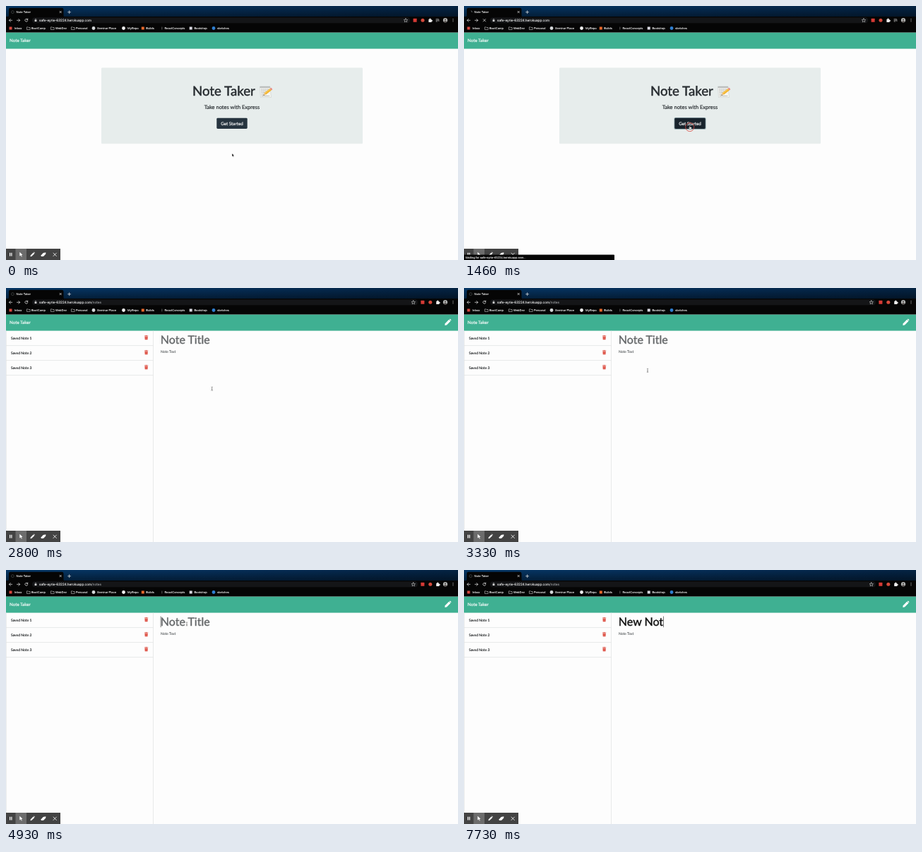
Animation, 640 px wide and 360 px high, one loop 8 s. Source, as an HTML page:

```html
<!DOCTYPE html>
<html lang="en">
<head>
<meta charset="utf-8">
<title>Note Taker</title>
<style>
  html, body { margin: 0; width: 100%; height: 100%; overflow: hidden; background: #fdfdfd; }
  svg { display: block; width: 100vw; height: 100vh; }
  text { font-family: Lato, sans-serif; text-rendering: geometricPrecision; white-space: pre; }
  text, tspan { fill: currentColor; stroke: currentColor; stroke-width: .025em; }
  .ui text { font-family: Inter, sans-serif; font-size: 4px; color: #f1f1f1; }
  .ui text.url { font-size: 4.64px; }
  .line { fill: none; stroke: #eee; stroke-width: .7; stroke-linecap: round; stroke-linejoin: round; }
</style>
</head>
<body>
<svg viewBox="0 0 640 360">
  <defs>
    <linearGradient id="strip" x2="1" y2="0">
      <stop offset="0" stop-color="#063766"/>
      <stop offset=".45" stop-color="#062f59"/>
      <stop offset="1" stop-color="#042343"/>
    </linearGradient>
    <linearGradient id="shade" x2="0" y2="1">
      <stop offset="0" stop-color="#000" stop-opacity="0"/>
      <stop offset="1" stop-color="#000" stop-opacity=".45"/>
    </linearGradient>
    <g id="trash" fill="#dc4a3d">
      <path d="M-2.6-2.6h1.5l.5-.6h1.2l.5.6h1.5v.8h-5.2z"/>
      <path d="M-2.2-1.4h4.4l-.3 4.6h-3.8z"/>
      <path d="M-.9-.5v2.8M0-.5v2.8M.9-.5v2.8" stroke="#fff" stroke-width=".35" opacity=".4"/>
    </g>
  </defs>

  <rect width="640" height="360" fill="#fdfdfd"/>
  <rect y="37.5" width="640" height="23.1" fill="#3fb092"/>
  <text x="5" y="51.2" font-size="6.25" color="#fff">Note Taker</text>

  <g id="home">
    <rect x="135" y="87.5" width="370" height="107.7" rx="1.3" fill="#e7edec"/>
    <text x="264" y="126.8" font-size="18.67" color="#262b2f">Note Taker</text>
    <g transform="translate(367.5 121.5)">
      <path d="M-8-7.6H6.4L8 8H-7z" fill="#f4f4f0" stroke="#c4c8c8" stroke-width=".5"/>
      <path d="M-8-7.6H6.4l.2 2H-7.9z" fill="#b9bcbb"/>
      <path d="M-6.3-3.6H5.2M-6.2-1.2H5M-6 1.2H1M-5.8 3.6H-1M-5.6 6H5.5" stroke="#8e9698" stroke-width=".7" stroke-dasharray="2 .5"/>
      <path d="M-3 5.2l1.3-3.6L6.2-4.6 8.3-2 .6 4z" fill="#f3b32c"/>
      <path d="M-2.2 3.2L6.8-3.6" stroke="#fad873" stroke-width=".8"/>
      <path d="M6.2-4.6l1.4-1.1q1.8.8 2.1 2.6L8.3-2z" fill="#e98a86"/>
      <path d="M-3 5.2l1.3-3.6L.6 4z" fill="#edc99a"/>
      <path d="M-3 5.2l.5-1.4.9.9z" fill="#333"/>
    </g>
    <text x="320" y="146.2" font-size="7.5" color="#262b2f" text-anchor="middle">Take notes with Express</text>
    <rect id="halo" x="297.4" y="157.9" width="45.2" height="17" rx="2" fill="#93a9ae"/>
    <rect id="button" x="298.3" y="158.8" width="43.4" height="15.2" rx="1.4"/>
    <text x="320" y="168.6" font-size="6.25" color="#fff" text-anchor="middle">Get Started</text>
  </g>

  <g id="notes">
    <path d="M.3 60.6V360M208.5 60.6V360" stroke="#dfe1e1" stroke-width=".7"/>
    <g id="rows" font-size="5" color="#16191b"></g>
    <g transform="translate(625.5 48.7) scale(1.06)" fill="#fff">
      <path d="M-4 4l.5-2.6L1.6-3.7 3.7-1.6-1.4 3.5z"/>
      <path d="M2.1-4.1l.5-.4q.5-.3 1 .1l.8.8q.4.5 0 1l-.4.5z"/>
    </g>
    <text id="title" x="218.8" y="79" font-size="16"></text>
    <text x="219" y="92.3" font-size="5" color="#5f6365">Note Text</text>
    <rect id="caret" y="65.6" width=".6" height="15.6" fill="#222"/>
  </g>

  <g class="ui">
    <rect width="640" height="16" fill="url(#strip)"/>
    <rect width="640" height="16" fill="url(#shade)"/>
    <path d="M2 15.5q2 0 2-2V5q0-2.3 2.3-2.3H79q2.5 0 2.5 2.3v8.5q0 2 2 2z" fill="#050505"/>
    <rect y="15" width="640" height="22.5" fill="#050505"/>
    <rect id="omnibox" x="37" y="16.2" height="8" rx="4" fill="#141517"/>
    <circle id="favicon" cx="9.4" cy="8.6" r="1.9" fill="none" stroke="#55595c" stroke-width=".6"/>
    <path id="spinner" d="M9.4 6.7a1.9 1.9 0 0 1 1.9 1.9" fill="none" stroke="#9aa0a6" stroke-width=".6"/>
    <text x="14.5" y="10.1">Note Taker</text>
    <path class="line" d="M76 7.3l2.4 2.4m0-2.4l-2.4 2.4M87.6 8.7h4M89.6 6.7v4"/>
    <path class="line" d="M8.7 20.3H4.6m1.8-1.9l-1.9 1.9 1.9 1.9M15.5 20.3h4.1m-1.8-1.9l1.9 1.9-1.9 1.9"/>
    <path id="reload" class="line" d="M30.5 19a2 2 0 1 0 .3 1.8M30.8 18v1.4h-1.4"/>
    <path id="stop" class="line" d="M27.2 18.6l3.4 3.4m0-3.4l-3.4 3.4"/>
    <rect x="40.6" y="19.7" width="2.8" height="2.4" rx=".3" fill="#ddd"/>
    <path class="line" d="M41.2 19.6v-.6a.8.8 0 0 1 1.6 0v.6" style="stroke-width:.5"/>
    <text class="url" x="47" y="21.6">safe-eyrie-63224.herokuapp.com<tspan id="path" color="#9a9da0">/notes</tspan></text>
    <g id="tools">
      <path class="line" style="stroke-width:.5" d="M566 17.7l.8 1.7 1.9.2-1.4 1.3.4 1.9-1.7-1-1.7 1 .4-1.9-1.4-1.3 1.9-.2z"/>
      <rect x="576.6" y="17.7" width="5" height="5" rx=".5" fill="#d63a35"/>
      <circle cx="590" cy="20.2" r="2.5" fill="#d64a3c"/>
      <path d="M598.4 18.8h1.3a.9.9 0 1 1 1.6 0h1.3v1.3a.9.9 0 1 1 0 1.5v1.3h-4.2z" fill="#eee"/>
    </g>
    <path id="media" class="line" d="M609 18.7h3.4M609 20.3h2.6M609 21.9h1.6m2.2-2.4v2.2" style="stroke-width:.6"/>
    <circle cx="622" cy="20.2" r="3.1" fill="#b4b6b5"/>
    <circle cx="622" cy="19.4" r="1.1" fill="#5b5552"/>
    <path d="M619.8 22.2q2.2-2.6 4.4 0a3 3 0 0 1-4.4 0z" fill="#5b5552"/>
    <path d="M633 18.5v.01M633 20.2v.01M633 21.9v.01" class="line" style="stroke-width:.9"/>
    <path class="line" d="M220.8 30v3" style="stroke:#999;stroke-width:.6"/>
    <g id="marks"></g>
  </g>

  <g id="recorder">
    <rect y="344" width="77" height="16" fill="#434343"/>
    <rect x="13.5" y="344" width="15.5" height="16" fill="#6c6c6c"/>
    <path d="M5 349.8h1.2v4.8H5zM7.3 349.8h1.2v4.8H7.3z" fill="#fff"/>
    <path d="M19.3 348.7l4.2 4.1-1.8.1 1.1 2.3-.9.4-1-2.3-1.6 1.2z" fill="#fff"/>
    <path d="M34.4 355.2l.5-2 3.8-3.8 1.5 1.5-3.8 3.8zM39.1 349l.6-.5 1.4 1.4-.5.6z" fill="#fff"/>
    <path d="M49.7 353.3l3-3.4 3.7-.7-.2 2.2-3 3.4-3.4.3z" fill="#fff"/>
    <path class="line" d="M67 350.1l4.4 4.4m0-4.4l-4.4 4.4" style="stroke:#fff;stroke-width:.8"/>
  </g>
  <g id="status" class="ui">
    <path d="M0 352.5h212q1 0 1 1V360H0z" fill="#050505"/>
    <text x="2" y="357.8" style="font-size:3.85px">Waiting for safe-eyrie-63224.herokuapp.com...</text>
  </g>

  <circle id="ring" fill="none" stroke="#d8453c" stroke-width=".8"/>
  <g id="pointer">
    <path id="arrow" d="M0 0v4.3l1-.9.8 1.7.8-.4-.8-1.6h1.4z" fill="#111" stroke="#fff" stroke-width=".35"/>
    <path id="hand" d="M-.5.2q.5-.5 1 0v1.7l1.7.4q.6.2.5.8l-.4 1.7H-.6l-1.3-2q.2-.6.8-.2l.6.5z" fill="#fff" stroke="#111" stroke-width=".45"/>
    <path id="beam" d="M-1.1-2.6q.9 0 1.1.5.2-.5 1.1-.5M0-2.1v4.2M-1.1 2.6q.9 0 1.1-.5.2.5 1.1.5M-.6.9H.6" fill="none" stroke="#333" stroke-width=".48"/>
  </g>
</svg>

<script>
const LOOP = 8000, STEP = 1000 / 15;
const CLICK = 1330, LOADING = 1395, COMMIT = 2395, PAGE = 2725, FOCUS = 4730;
const TYPED = "New Not", KEYS = [6930, 7060, 7200, 7330, 7400, 7530, 7730];
// time, x, y of the pointer's hot spot
const TRACK = [
  [0, 320, 209], [430, 320.4, 193], [860, 320, 174], [1190, 319.7, 169.6],
  [2200, 319.7, 169.6], [2600, 308.8, 158], [2930, 280, 133],
  [3330, 260, 117], [4060, 257, 84], [4400, 256, 76.5]
];

const el = {};
document.querySelectorAll("[id]").forEach(n => el[n.id] = n);
const show = (node, on) => node.style.display = on ? "" : "none";
const set = (node, attrs) => { for (const k in attrs) node.setAttribute(k, attrs[k]); };

el.rows.innerHTML = [1, 2, 3].map(n => {
  const y = 61 + 21 * n;
  return `<text x="7" y="${y - 9}">Saved Note ${n}</text>
    <use href="#trash" x="198.6" y="${y - 11.9}"/>
    <path d="M0 ${y - .4}H208.5" stroke="#dfe1e1" stroke-width=".7"/>`;
}).join("");

const icons = {
  square: (x, c) => `<rect x="${x - 2}" y="29.5" width="4" height="4" fill="${c}"/>`,
  circle: (x, c) => `<circle cx="${x}" cy="31.5" r="2.4" fill="${c}"/>`,
  folder: x => `<path class="line" style="stroke-width:.5" d="M${x - 2.2} 29.9h1.6l.6.6h2.2v2.9h-4.4z"/>`
};
el.marks.innerHTML = [
  ["square", 6.5, "Inbox", 12, "#d8493f"], ["folder", 32, "BootCamp", 36],
  ["folder", 66, "WebDev", 70], ["folder", 95, "Personal", 99],
  ["circle", 124, "Seminar Place", 129, "#d5d8da"], ["circle", 166.5, "MyRepo", 172, "#f2f2f2"],
  ["square", 193.8, "Builds", 198.3, "#e8692c"], [null, 0, "ReactConcepts", 224.5],
  ["square", 261.7, "Bootstrap", 266.4, "#d9d9e2"], ["circle", 294, "sketches", 299, "#2f7fd0"]
].map(([kind, x, label, tx, c]) =>
  (kind ? icons[kind](x, c) : "") + `<text x="${tx}" y="32.7">${label}</text>`).join("");

// Monotone cubic through the track, so pauses stay still
function slope(i, k) {
  const a = TRACK[i - 1], b = TRACK[i], c = TRACK[i + 1];
  if (!a || !c) return 0;
  const p = (b[k] - a[k]) / (b[0] - a[0]), q = (c[k] - b[k]) / (c[0] - b[0]);
  return p * q <= 0 ? 0 : 2 * p * q / (p + q);
}
function pointerAt(t) {
  const last = TRACK.length - 1;
  if (t >= TRACK[last][0]) return TRACK[last].slice(1);
  const i = TRACK.findIndex(p => p[0] > t) - 1;
  const a = TRACK[i], b = TRACK[i + 1], d = b[0] - a[0], u = (t - a[0]) / d, v = 1 - u;
  return [1, 2].map(k =>
    v * v * (1 + 2 * u) * a[k] + u * u * (3 - 2 * u) * b[k] +
    d * u * v * (v * slope(i, k) - u * slope(i + 1, k)));
}

function draw(time) {
  const t = Math.floor((time + 7) / STEP) * STEP;
  const onNotes = t >= PAGE, clicked = t >= CLICK, loading = t >= LOADING && !onNotes;
  const [x, y] = pointerAt(t);
  const over = !onNotes && x > 298 && x < 342 && y > 158.8 && y < 174;

  show(el.home, !onNotes);
  show(el.notes, onNotes);
  show(el.halo, clicked);
  set(el.button, { fill: over || clicked ? "#18232c" : "#26343f" });

  show(el.status, loading);
  show(el.favicon, !loading);
  show(el.spinner, loading);
  set(el.spinner, { transform: `rotate(${t * .5 % 360} 9.4 8.6)` });
  show(el.reload, !loading);
  show(el.stop, loading);

  const committed = t >= COMMIT, shift = committed ? 10.8 : 0;
  show(el.path, committed);
  show(el.media, !committed);
  set(el.tools, { transform: `translate(${shift} 0)` });
  set(el.omnibox, { width: 535 + shift });

  const count = KEYS.filter(k => t + 7 >= k).length;
  el.title.textContent = count ? TYPED.slice(0, count) : "Note Title";
  set(el.title, { color: count ? "#111" : "#646769" });
  const blink = Math.floor((t - FOCUS + 7) / 500) % 2 === 0;
  show(el.caret, t + 7 >= FOCUS && (count || blink));
  set(el.caret, { x: 218.8 + (onNotes && count ? el.title.getComputedTextLength() : 0) });

  const age = t - (t < 4000 ? CLICK : FOCUS);
  show(el.ring, age >= 0 && age < 195);
  set(el.ring, { cx: x, cy: y + (onNotes ? 0 : 2), r: 3 + Math.max(0, age) / 45 });

  set(el.pointer, { transform: `translate(${x} ${y})` });
  show(el.hand, over);
  show(el.beam, onNotes && !count);
  show(el.arrow, !over && !onNotes);
}

function tick(now) {
  draw(now % LOOP);
  requestAnimationFrame(tick);
}
draw(0);
requestAnimationFrame(tick);
</script>
</body>
</html>
```
